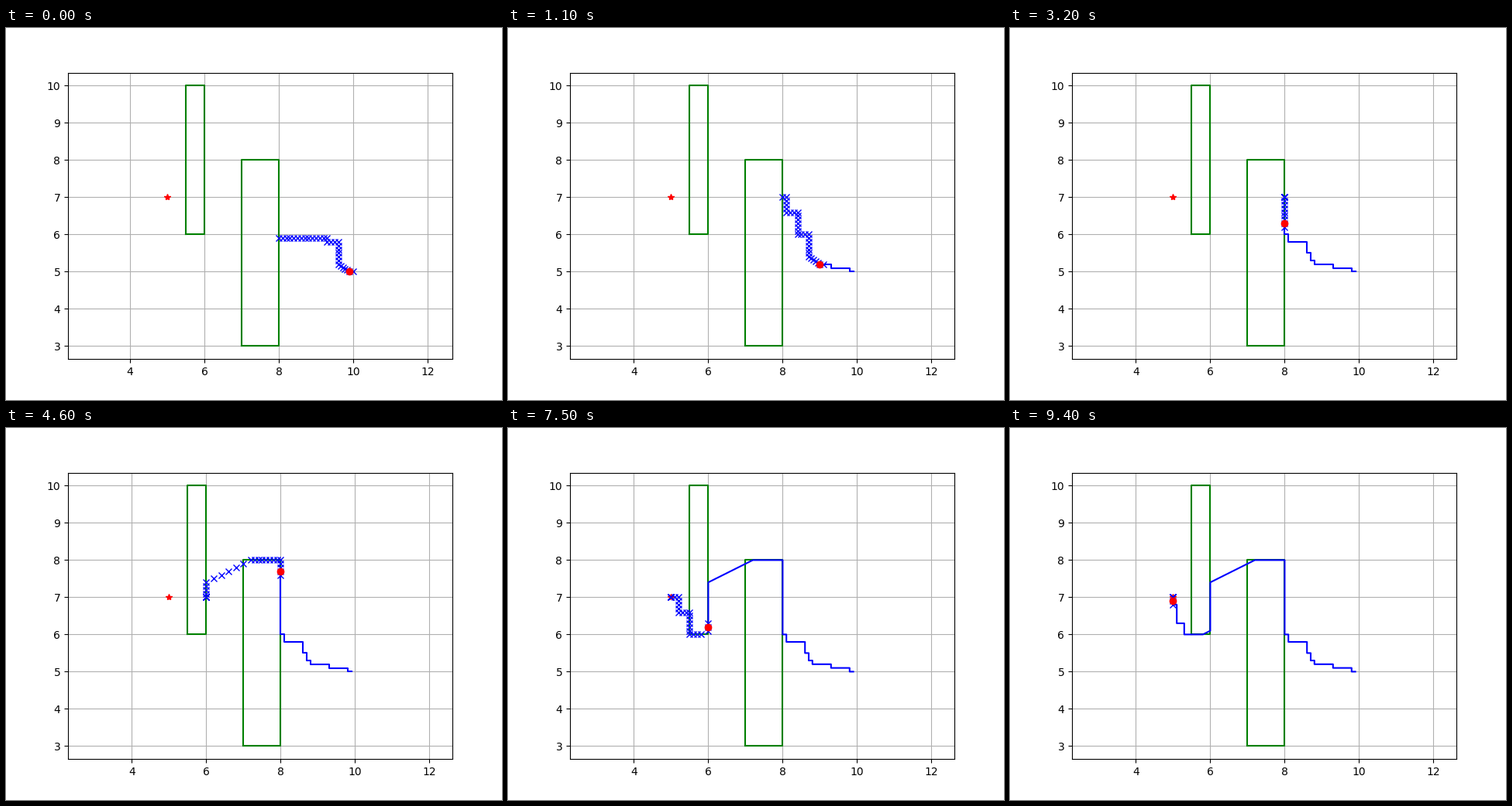
A matplotlib script that plays this animation: 640x480 px, repeating every 9.5 s.

```python
import matplotlib.pyplot as plt
from matplotlib.animation import FuncAnimation

FRAMES, INTERVAL = 95, 100
HORIZON = 30          # positions in each plan
RISE, RUN = 6, 3      # size of one planned stair

# Positions are in tenths of an axis unit
GOAL = (50, 70)
WALL_STOP = (80, 70)
GAP_CORNER = (55, 60)
KEY_POINTS = [(100, 50), (98, 50), (93, 51), (88, 52), (87, 53), (86, 55),
              (81, 58), (80, 60), (80, 80), (72, 80), (60, 74), (60, 61),
              (58, 60), (53, 60), (51, 63), (50, 68), (50, 69)]


def with_corners(points):
    """Climb straight up before going left; descend directly."""
    out = points[:1]
    for (x0, y0), (x1, y1) in zip(points, points[1:]):
        if y1 > y0:
            out.append((x0, y1))
        out.append((x1, y1))
    return out


def walk(points):
    """Split a polyline into single steps; slopes of one half go faster."""
    out = [points[0]]
    for (x0, y0), (x1, y1) in zip(points, points[1:]):
        dx, dy = x1 - x0, y1 - y0
        leap = dy and abs(dx) == 2 * abs(dy)
        n = round(abs(dy) if leap else abs(dx) + abs(dy))
        out += [(x0 + dx * i / n, y0 + dy * i / n) for i in range(1, n + 1)]
    return out


def stairs(start, end):
    """Corners of a regular staircase going up and left."""
    (x, y), corners = start, []
    while (x, y) != end:
        y = min(y + RISE, end[1])
        corners.append((x, y))
        x = max(x - RUN, end[0])
        corners.append((x, y))
    return corners


PATH = walk(with_corners(KEY_POINTS))


def plan(k):
    if k < 38:      # towards the first wall
        x, y = PATH[k + 1]
        wall_x, wall_y = WALL_STOP
        end = (wall_x, min(wall_y, y + HORIZON - 2 - (x - wall_x)))
        lead = (max(x - 3, wall_x), min(y + 2, end[1]))
        points = PATH[k:k + 2] + [lead] + stairs(lead, end)
    elif k < 68:    # over the first wall, up to the second
        points = PATH[k:69]
    else:           # under the second wall to the goal
        points = PATH[k:max(k + 2, 79)]
        if points[-1][0] > GAP_CORNER[0]:
            points = points + [GAP_CORNER]
        points = points + stairs(points[-1], GOAL)
    steps = walk(points)[:HORIZON]
    return steps + steps[-1:] * (HORIZON - len(steps))


def draw(points, style):
    ax.plot([x / 10 for x, _ in points], [y / 10 for _, y in points], style)


def box(x0, y0, x1, y1):
    ax.plot([x0, x1, x1, x0, x0], [y0, y0, y1, y1, y0], "-g")


fig, ax = plt.subplots(figsize=(6.4, 4.8), dpi=100)


def update(k):
    ax.cla()
    draw([GOAL], "*r")
    box(7, 3, 8, 8)
    box(5.5, 6, 6, 10)
    draw(plan(k), "xb")
    draw(PATH[1:k + 2], "-b")
    draw([PATH[k + 1]], "or")
    ax.axis("equal")
    ax.grid(True)


anim = FuncAnimation(fig, update, frames=FRAMES, interval=INTERVAL,
                     repeat=True, repeat_delay=0, blit=False)
plt.show()
```
